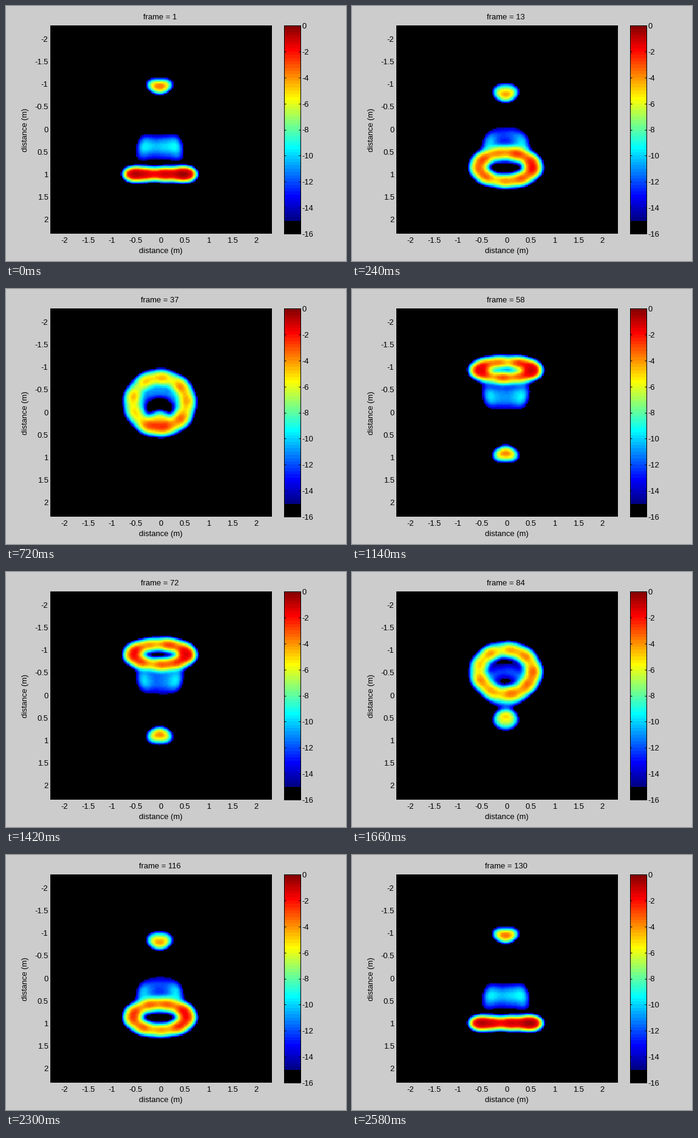
Animation of 560x420 px, one loop 2600 ms. Source, as a matplotlib script:

```python
import numpy as np
import matplotlib.pyplot as plt
from matplotlib.animation import FuncAnimation
from matplotlib.colors import ListedColormap

W, H, DPI = 560, 420, 72
FRAMES, INTERVAL = 130, 20
XLIM, YLIM = 2.33, 2.31
CELLS = 155
SHARP, SOFT = 80.6, 60      # point spread, 1/m^2
X_SHIFT = -0.03
TURN = 2.88                 # degrees per frame

plt.rcParams["font.family"] = "Liberation Sans"
plt.rcParams["font.size"] = 13


def radar_map():
    """Four black levels below 60 levels of jet."""
    i = np.arange(1, 61)

    def ramp(center):
        return np.clip((22.5 - np.abs(i - center)) / 15, 0, 1)

    jet = np.column_stack([ramp(45.5), ramp(30.5), ramp(15.5)])
    return ListedColormap(np.vstack([np.zeros((4, 3)), jet]))


def loop_points(radius, axial, count, power):
    """Points on a circle around the axis: angle, radius, axial place, power."""
    phi = (np.arange(count) + 0.5) * 2 * np.pi / count
    one = np.ones(count)
    return np.column_stack([phi, radius * one, axial * one, power / count * one])


def build_target():
    ring = [loop_points(r, 0.99, 80, 7.4 / 4) for r in (0.5, 0.56, 0.615, 0.67)]

    cone = [loop_points(0.36 + 0.2 * (a - 0.16), a, 44, 0.08)
            for a in np.linspace(0.16, 0.65, 11)]
    cone.append(loop_points(0.39, 0.38, 44, 0.15))

    rims = (np.arange(6) + 0.5) / 6
    cap = [loop_points(0.2 * t, -0.86 - 0.16 * t, 20, 0.87 * t / rims.sum())
           for t in rims]
    return np.vstack(ring), np.vstack(cone), np.vstack(cap)


ring, cone, cap = build_target()
cone[:, 3] *= 1 - 0.35 * np.cos(cone[:, 0]) ** 2
phi, radius, axial, power = np.vstack([ring, cone, cap]).T


def per_part(*values):
    return np.repeat(values, [len(ring), len(cone), len(cap)])


speckle = per_part(1.0, 0.5, 0.0)
falloff = per_part(SHARP, SOFT, SHARP)

centers = (np.arange(CELLS) + 0.5) / CELLS * 2 - 1
grid_x, grid_y = centers * XLIM, centers * YLIM
gain_x = np.exp(-falloff[:, None] * (grid_x[None, :] - X_SHIFT
                                     - (radius * np.cos(phi))[:, None]) ** 2)


def level(n):
    """Image in dB for one step of the turn."""
    turn = np.radians(np.clip(TURN * (n - 0.5), 0, 360))
    y = axial * np.cos(turn) + radius * np.sin(phi) * np.sin(turn)
    ripple = (0.5 * np.cos(phi) + 0.6 * np.sin(5 * phi + 2 * turn + 0.6)
              + 1.1 * np.sin(9 * phi - 3 * turn + 1.1))
    weight = power * 10 ** (speckle * ripple / 10)
    gain_y = np.exp(-falloff * (grid_y[:, None] - y[None, :]) ** 2)
    db = 10 * np.log10((gain_y * weight) @ gain_x + 1e-6)
    return np.where(db > -2, -2 + 0.4 * (db + 2), db)


fig = plt.figure(figsize=(W / DPI, H / DPI), dpi=DPI, facecolor="0.8")
cmap = radar_map()


def panel(left, top, right, bottom):
    return fig.add_axes([left / W, 1 - bottom / H,
                         (right - left) / W, (bottom - top) / H])


def label(x, y, text, ha="center", **kw):
    return fig.text(x / W, 1 - y / H, text, ha=ha, **kw)


ax = panel(73, 32, 438, 375)
ax.set_axis_off()
image = ax.imshow(level(0), cmap=cmap, vmin=-16, vmax=0, aspect="auto",
                  interpolation="nearest", extent=[-XLIM, XLIM, YLIM, -YLIM])

bar = panel(458, 32, 485, 375)
bar.imshow(np.arange(64)[:, None], cmap=cmap, aspect="auto", origin="lower",
           interpolation="nearest", extent=[0, 1, -16, 0])
bar.set_xticks([])
bar.set_yticks(range(-16, 1, 2))
bar.tick_params(direction="in", length=3, width=1, left=True, right=True,
                labelleft=False)
for spine in bar.spines.values():
    spine.set_linewidth(1)

for v in np.arange(-2, 2.1, 0.5):
    text = f"{v:g}"
    minus = 3 if v < 0 else 0
    label(255.5 + v * 78.3 - minus, 390.5, text)
    label(69.5, 207.5 + v * 74.2, text, ha="right")
for v in range(-16, 1, 2):
    label(487.5, 37 - v * 343 / 16, f"{v}", ha="left")

label(254.5, 407, "distance (m)")
label(32, 204, "distance (m)", rotation=90, va="center")
title = label(253.5, 22, "frame = 1")


def draw(n):
    image.set_data(level(n))
    title.set_text(f"frame = {n + 1}")
    return image, title


anim = FuncAnimation(fig, draw, frames=FRAMES, interval=INTERVAL,
                     repeat=True, repeat_delay=0, blit=False)
plt.show()
```
